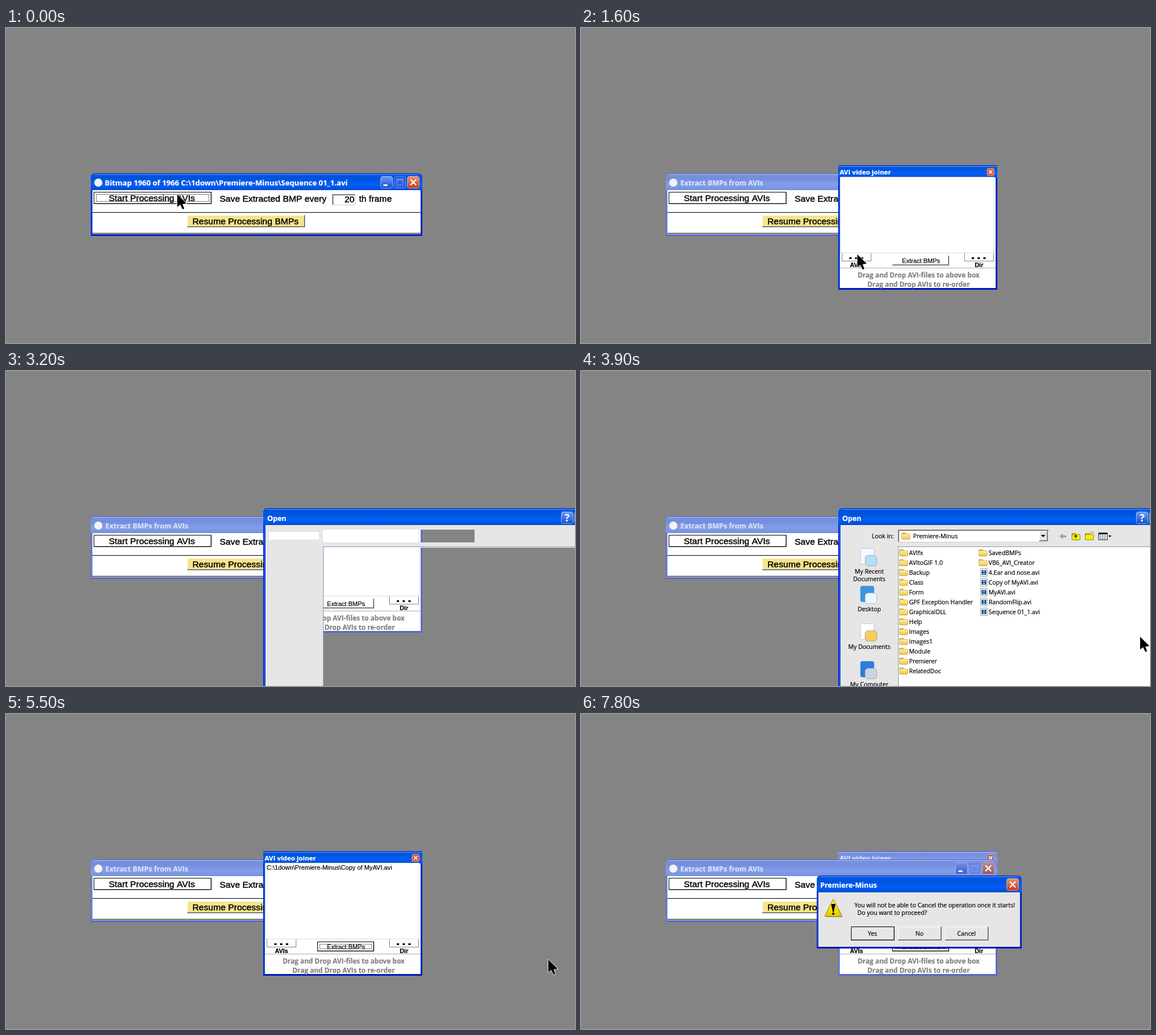
An HTML page with a canvas for the animation above (8000 ms loop, 980 by 544 pixels).

```html
<!DOCTYPE html>
<html lang="en">
<head>
<meta charset="utf-8">
<style>
html, body { margin: 0; width: 980px; height: 544px; overflow: hidden; background: #848484; }
canvas { display: block; }
</style>
</head>
<body>
<canvas id="stage" width="980" height="544"></canvas>
<script>
const ctx = document.getElementById('stage').getContext('2d');
const LOOP = 8000, STEP = 100;
const sans = (size, weight = 400) => `${weight} ${size}px "Open Sans", "Noto Sans", sans-serif`;
const arial = (size, weight = 400) => `${weight} ${size}px "Liberation Sans", Arial, sans-serif`;
const SMALL = sans(10.35), CAPTION = sans(12.3, 700), HINT = sans(11.6, 700);
const FORM = arial(15.4), LIST = arial(10.8), TAG = arial(10.4, 700);
const FACE = '#e6e6e6', DIM = '#d8e4f8';

const ACTIVE = { edge: '#0019b8', side: '#0050e8', shine: '#2c84fa', bar: ['#0054e0', '#0052dc', '#0060f8', '#004cd0'] };
const INACTIVE = { edge: '#5a66c8', side: '#7488e2', shine: '#90a9ee', bar: ['#768fdd', '#758edd', '#829eea', '#7890dc'] };

// When windows and their parts appear or change.
const at = {
  press: 400, release: 600, joiner: 900, browse: 2100, open: 3000, face: 3100, files: 3400,
  select: 4900, close: 5100, rejoin: 5200, added: 5400, focus: 5500, confirm: 7500, raise: 7600, ask: 7700, message: 7800
};

// Cursor glides: start, end, target x and y.
const glides = [
  [0, 0, 295, 287], [600, 1000, 301, 348], [1200, 1400, 434, 391], [1600, 1600, 476, 391], [2300, 2700, 466, 401],
  [3900, 3900, 963, 459], [4000, 4000, 855, 391], [4200, 4700, 739, 363],
  [5500, 5500, 934, 424], [5700, 6000, 850, 330], [6200, 6600, 703, 346], [6700, 7000, 594, 407]
];
const hidden = t => between(t, at.open, 3900) || between(t, at.close, at.focus) || between(t, 5800, 6000) || t >= at.confirm;
const between = (t, start, end) => t >= start && t < end;

function rect(x, y, w, h, color) {
  ctx.fillStyle = color;
  ctx.fillRect(x, y, w, h);
}

function frame(x, y, w, h, color, dash = []) {
  ctx.setLineDash(dash);
  ctx.lineWidth = 1;
  ctx.strokeStyle = color;
  ctx.strokeRect(x + .5, y + .5, w - 1, h - 1);
  ctx.setLineDash([]);
}

// A hairline stroke gives the text the weight of screen fonts.
function text(str, x, y, font = SMALL, color = '#000', align = 'left') {
  ctx.font = font;
  ctx.fillStyle = ctx.strokeStyle = color;
  ctx.textAlign = align;
  ctx.lineWidth = font === FORM ? .45 : .2;
  ctx.lineJoin = 'round';
  ctx.fillText(str, x, y);
  ctx.strokeText(str, x, y);
}

function paint(fill, stroke, width = 1) {
  if (stroke) { ctx.strokeStyle = stroke; ctx.lineWidth = width; ctx.stroke(); }
  if (fill) { ctx.fillStyle = fill; ctx.fill(); }
}

function rounded(x, y, w, h, r, fill, stroke) {
  ctx.beginPath();
  ctx.roundRect(x, y, w, h, r);
  paint(fill, stroke);
}

function circle(x, y, r, fill, stroke) {
  ctx.beginPath();
  ctx.arc(x, y, r, 0, Math.PI * 2);
  paint(fill, stroke);
}

function triangle(x, tip, half, height, fill, stroke) {
  ctx.beginPath();
  ctx.moveTo(x, tip);
  ctx.lineTo(x + half, tip + height);
  ctx.lineTo(x - half, tip + height);
  ctx.closePath();
  paint(fill, stroke, 2);
}

function gradient(y, h, colors) {
  const g = ctx.createLinearGradient(0, y, 0, y + h);
  colors.forEach((c, i) => g.addColorStop(i / (colors.length - 1), c));
  return g;
}

function titleBar(x, y, w, h, look, radius = 6) {
  rounded(x, y, w, h, [radius, radius, 0, 0], gradient(y, h, look.bar));
  rect(x + radius, y, w - 2 * radius, 1, look.edge);
  rect(x + radius, y + 1, w - 2 * radius, 2, look.shine);
}

function windowFrame(x, y, w, h, barHeight, look, fill, radius) {
  rect(x, y + barHeight, w, h - barHeight, look.edge);
  rect(x + 1, y + barHeight, 2, h - barHeight - 2, look.side);
  rect(x + w - 3, y + barHeight, 1, h - barHeight - 2, look.side);
  rect(x + 3, y + barHeight, w - 6, h - barHeight - 3, fill);
  titleBar(x, y, w, barHeight, look, radius);
}

function cross(cx, cy, r, width) {
  ctx.beginPath();
  for (const side of [-1, 1]) {
    ctx.moveTo(cx - r * side, cy - r);
    ctx.lineTo(cx + r * side, cy + r);
  }
  paint(null, '#fff', width);
}

function captionButton(x, y, kind, active = true) {
  const blue = active ? ['#6c9cf8', '#1c50cc'] : ['#6f94ea', '#3c60cc'];
  const red = active ? ['#f09070', '#c83c18'] : ['#c08888', '#a05858'];
  const dim = kind === 'max';
  const fill = dim ? (active ? '#2a62e0' : '#6a86dc') : gradient(y, 20, kind === 'close' ? red : blue);
  rounded(x + .5, y + .5, 20, 20, 3, fill, dim ? '#86a6f0' : active ? '#fff' : '#ccd8f6');
  if (kind === 'close') cross(x + 10.5, y + 10.5, 5, 2.2);
  if (kind === 'min') rect(x + 5, y + 14, 7, 3, '#fff');
  if (kind === 'help') text('?', x + 10.5, y + 17, sans(17, 700), '#fff', 'center');
  if (dim) {
    frame(x + 5, y + 5, 11, 11, '#7c9ef0');
    rect(x + 5, y + 5, 11, 2, '#7c9ef0');
  }
}

function button(x, y, w, h, fill, strong, focused) {
  rect(x, y, w, h, '#555');
  rect(x, y, w - 1, h - 1, '#fff');
  rect(x + 1, y + 1, w - 2, h - 2, '#aca899');
  rect(x + 1, y + 1, w - 3, h - 3, fill);
  if (strong) frame(x, y, w, h, '#000');
  if (focused) frame(x + 4, y + 4, w - 8, h - 8, '#000', [1, 1]);
}

function sunken(x, y, w, h) {
  rect(x, y, w, h, '#d4d0c8');
  rect(x, y, w - 1, h - 1, '#807870');
  rect(x + 2, y + 2, w - 3, h - 3, '#fff');
}

function mainWindow(t) {
  const active = t < at.release, pressed = between(t, at.press, at.release) ? 1 : 0;
  windowFrame(146, 251, 571, 108, 29, active ? ACTIVE : INACTIVE, '#fff');
  circle(159, 267, 7, '#f4f4f0');
  if (t < at.joiner) {
    text('Bitmap 1960 of 1966 C:\\1down\\Premiere-Minus\\Sequence 01_1.avi', 170, 272, sans(12.85, 700), active ? '#fff' : DIM);
  } else {
    text('Extract BMPs from AVIs', 171, 272, CAPTION, DIM);
  }
  ['min', 'max', 'close'].forEach((kind, i) => captionButton(645 + 23 * i, 256, kind, active));

  button(151, 283, 203, 21, '#fff', true, t < at.joiner);
  text('Start Processing AVIs', 177 + pressed, 299 + pressed, FORM);
  text('Save Extracted BMP every', 368, 300, FORM);
  sunken(562, 287, 40, 19);
  text('20', 600, 301, FORM, '#000', 'right');
  text('th frame', 608, 300, FORM);
  button(312, 323, 203, 21, '#f5e58c');
  text('Resume Processing BMPs', 321, 339, FORM);
  for (const y of [318, 354]) rect(149, y, 565, 1, '#000');
}

function browseButton(x, label) {
  rect(x, 389, 51, 14, '#888');
  rect(x + 1, 389, 49, 13, '#fff');
  for (let i = 0; i < 3; i++) rect(x + 13 + i * 10, 396, 4, 3, '#000');
  text(label, x + 25.5, 413, TAG, '#000', 'center');
}

function joinerWindow(t) {
  const active = t < at.browse || between(t, at.rejoin, at.confirm);
  windowFrame(443, 237, 274, 215, 21, active ? ACTIVE : INACTIVE, '#fff', 0);
  text('AVI video joiner', 445.5, 253, sans(11.35, 700), active ? '#fff' : DIM);
  rounded(699.5, 242.5, 12, 12, 2, active ? '#e0532c' : '#a86470', '#fff');
  cross(705.5, 248.5, 3, 1.7);
  if (t === at.joiner) return;
  frame(446, 257, 266, 132, '#dcdcdc');
  if (t >= at.added) text('C:\\1down\\Premiere-Minus\\Copy of MyAVI.avi', 449, 269, LIST);
  browseButton(449, 'AVIs');
  browseButton(660, 'Dir');
  const focused = t >= at.focus;
  button(536, 393, 98, 17, '#fff', focused, focused);
  text('Extract BMPs', 553, 406, LIST);
  rect(446, 414, 268, 1, '#b8aca4');
  ['Drag and Drop AVI-files to above box', 'Drag and Drop AVIs to re-order']
    .forEach((line, i) => text(line, 581.5, 431 + 16 * i, HINT, '#808080', 'center'));
}

function folder(x, y, light = '#fff2a8', dark = '#f0c04c', line = '#b88c20') {
  rounded(x + .5, y + 1.5, 7, 5, 1.5, dark, line);
  rounded(x + .5, y + 3.5, 14, 9, 1.5, gradient(y + 3, 10, [light, dark]), line);
}

function movieFile(x, y) {
  rect(x, y, 12, 14, '#fff');
  frame(x, y, 12, 14, '#8c98a8');
  rect(x + 2, y + 3, 8, 8, '#26507c');
  for (const dy of [4, 8]) rect(x + 4, y + dy, 4, 2, '#7cc4f0');
}

const places = [
  ['My Recent', '#f6f9ff', '#b8dcf4'], ['Desktop', '#3a94e4', '#eef6ff'],
  ['My Documents', '#fff', '#f6cc5c'], ['My Computer', '#2c7cdc', '#cad4e0']
];

function placesBar() {
  places.forEach(([label, back, front], i) => {
    const y = 350 + 65 * i;
    rounded(481.5, y - 43.5, 23, 27, 3, back, '#7c98c4');
    rounded(489.5, y - 31.5, 20, 18, 5, front, '#6088b0');
    text(label, 496.5, y, SMALL, '#000', 'center');
  });
  text('Documents', 496.5, 363, SMALL, '#000', 'center');
}

function toolbar() {
  ctx.save();
  ctx.translate(824, 285.5);
  ctx.rotate(-Math.PI / 2);
  triangle(0, 0, 5, 6, '#a4a094');
  ctx.restore();
  rect(830, 284, 6, 3, '#a4a094');
  for (const x of [845, 868]) folder(x, 279, '#fff000', '#fff000', '#222');
  triangle(852, 283, 3, 3, '#000');
  rect(852, 286, 1, 3, '#000');
  circle(880, 280.5, 2.5, '#f8e030', '#555');
  rect(891, 279, 16, 13, '#fff');
  frame(891, 279, 16, 13, '#222');
  rect(891, 279, 16, 3, '#222');
  for (let i = 0; i < 9; i++) rect(893 + i % 3 * 4, 283 + Math.floor(i / 3) * 3, 3, 1, '#335');
  triangle(911, 287, 3, -3, '#000');
}

const folders = ['AVIfx', 'AVItoGIF 1.0', 'Backup', 'Class', 'Form', 'GPF Exception Handler', 'GraphicalDLL',
  'Help', 'Images', 'Images1', 'Module', 'Premierer', 'RelatedDoc', 'SavedBMPs', 'VB6_AVI_Creator'];
const movies = ['4.Ear and nose.avi', 'Copy of MyAVI.avi', 'MyAVI.avi', 'RandomFlip.avi', 'Sequence 01_1.avi'];
const ROWS = 13;

function fileList(t) {
  [...folders, ...movies].forEach((name, i) => {
    const x = i < ROWS ? 548 : 685, y = 307 + (i % ROWS) * 17;
    const selected = t >= at.select && name === movies[1];
    if (i < folders.length) folder(x, y); else movieFile(x + 3, y);
    if (selected) {
      rect(x + 3, y, 12, 14, 'rgba(49,106,197,.55)');
      rect(x + 16, y - 1, 94, 17, '#316ac5');
      frame(x + 16, y - 1, 94, 17, '#ce953a', [1, 1]);
    }
    text(name, x + 17, y + 11, SMALL, selected ? '#fff' : '#000');
  });
}

function openDialog(t) {
  const painted = t >= at.files;
  // The combo box and the list still show what lies behind until the files are there.
  ctx.beginPath();
  ctx.rect(443, 266, 537, 278);
  if (!painted) {
    ctx.rect(546, 274, 261, 22);
    ctx.rect(547, 304, 433, 240);
  }
  ctx.fillStyle = FACE;
  if (t >= at.face) ctx.fill('evenodd');
  rect(443, 250, 4, 294, ACTIVE.side);
  rect(443, 250, 1, 294, ACTIVE.edge);
  titleBar(443, 237, 600, 29, ACTIVE);
  text('Open', 450, 259, CAPTION, '#fff');
  captionButton(956, 243, 'help');
  captionButton(979, 243, 'close');
  if (t < at.face) return;
  rect(546, 303, 434, 1, '#7f9db9');
  rect(546, 303, 1, 241, '#7f9db9');
  if (!painted) {
    rect(453, 278, 86, 13, '#fff');
    rect(547, 304, 433, 1, '#fff');
    return;
  }
  rect(547, 304, 433, 240, '#fff');
  text('Look in:', 501, 289);
  sunken(546, 274, 260, 22);
  button(789, 276, 15, 18, FACE);
  triangle(796, 287, 4, -4, '#000');
  folder(552, 278);
  text('Premiere-Minus', 572, 289);
  toolbar();
  placesBar();
  fileList(t);
}

function messageBox(t) {
  windowFrame(406, 279, 353, 126, 29, ACTIVE, FACE);
  text('Premiere-Minus', 412, 300, CAPTION, '#fff');
  captionButton(733, 284, 'close');
  if (t < at.message) return;
  ctx.lineJoin = 'round';
  triangle(437, 323, 14, 28, 'rgba(0,0,0,.25)');
  triangle(434.5, 321, 14, 28, gradient(320, 30, ['#fff868', '#f8e800', '#e4c400']), '#a08c00');
  triangle(434.5, 341, 2.5, -12, '#000', '#000');
  circle(434.5, 345, 2, '#000');
  text('You will not be able to Cancel the operation once it starts!', 471, 334);
  text('Do you want to proceed?', 476, 347);
  ['Yes', 'No', 'Cancel'].forEach((label, i) => {
    button(465 + i * 81, 367, 75, 24, FACE, i === 0);
    text(label, 502 + i * 81, 383, SMALL, '#000', 'center');
  });
}

function cursor(t) {
  if (hidden(t)) return;
  let x, y;
  for (const [start, end, toX, toY] of glides) {
    if (t < start) break;
    const p = Math.min(1, (t - start + STEP) / (end - start + STEP));
    x = Math.round(p < 1 ? x + (toX - x) * p : toX);
    y = Math.round(p < 1 ? y + (toY - y) * p : toY);
  }
  ctx.save();
  ctx.translate(x, y);
  ctx.beginPath();
  [[0, 0], [0, 22], [5, 18], [9, 26], [12, 25], [9, 17], [16, 16]].forEach(([px, py]) => ctx.lineTo(px, py));
  ctx.closePath();
  paint('#000', '#fff', 1.6);
  ctx.restore();
}

function draw(now) {
  const t = Math.floor(now % LOOP / STEP) * STEP;
  rect(0, 0, 980, 544, '#848484');
  const layers = [mainWindow];
  if (t >= at.joiner) layers.push(joinerWindow);
  if (t >= at.raise) layers.reverse();
  if (between(t, at.open, at.close)) layers.push(openDialog);
  if (t >= at.ask) layers.push(messageBox);
  [...layers, cursor].forEach(paintLayer => paintLayer(t));
  requestAnimationFrame(draw);
}
requestAnimationFrame(draw);
</script>
</body>
</html>
```
